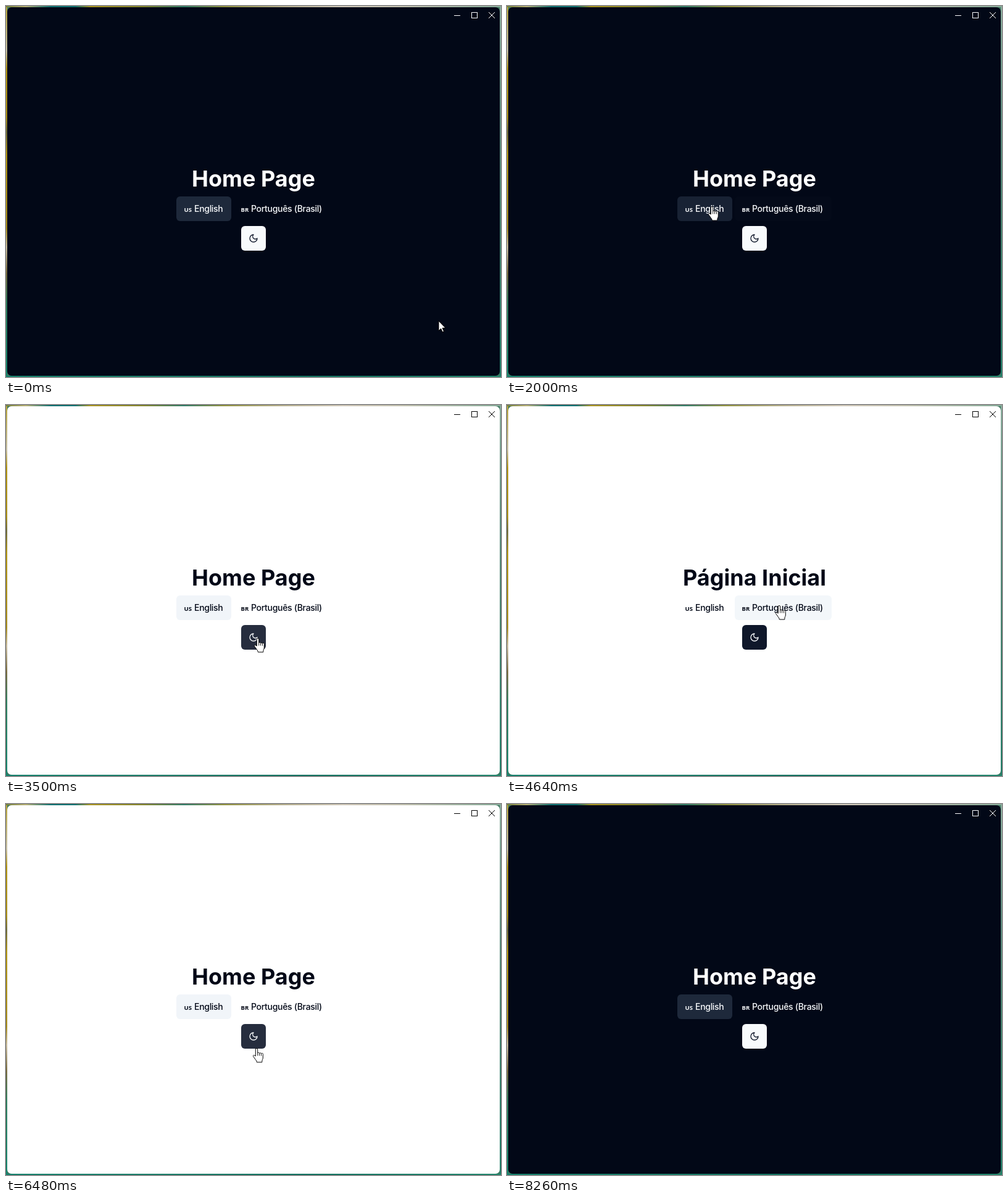
An HTML page that plays this animation: 802 px wide and 602 px high, repeating every 8.8 s.

```html
<!DOCTYPE html>
<html lang="en">
<head>
<meta charset="utf-8">
<title>Home Page</title>
<style>
  html, body { margin: 0; width: 100%; height: 100%; overflow: hidden; }
  body {
    background:
      linear-gradient(90deg, #75803a, #b5ad72 4%, #0d6f70 9%, #0d6f70 14%, #a8921f 17%, #80812a 28%, #2f7a66 36%, #8f8f3c 44%, #b5ad8c 56%, #cfc7b8 68%, #c2c0ae 80%, #86ab98) 0 0 / 100% 2px no-repeat,
      linear-gradient(90deg, #15806c, #1b7c68 30%, #12705f 60%, #22856c) 0 100% / 100% 2px no-repeat,
      linear-gradient(#b5a235, #c4bda2 12%, #b0920f 17%, #a88d14 30%, #6d6a3a 34%, #b0930f 40%, #a58a1a 60%, #c3b79b 65%, #77693c 72%, #2c7c5c 80%, #12836c) 0 0 / 2px 100% no-repeat,
      linear-gradient(#8aae9d, #5f8d80 30%, #43806d 60%, #1d7c66) 100% 0 / 2px 100% no-repeat,
      #3f7a62;
  }
  svg { display: block; }
  text { font-family: Inter, sans-serif; white-space: pre; }
  #title { font-size: 36px; font-weight: 700; text-anchor: middle; }
  .label { font-size: 14px; font-weight: 500; letter-spacing: -.3px; }
  .flag { font: 600 9.6px "Noto Sans", sans-serif; }
</style>
</head>
<body>
<svg width="802" height="602" viewBox="0 0 802 602">
  <rect id="win" x="2" y="2" width="798" height="598" rx="7"/>
  <g id="controls" fill="none">
    <path d="M726 15.5h10M754.5 10.5h9v9h-9z" shape-rendering="crispEdges"/>
    <path d="M782 10l10 10M792 10l-10 10"/>
  </g>
  <text id="title" x="401" y="293"></text>
  <rect id="enBox" x="276" y="309" width="89" height="40" rx="6"/>
  <g id="enText"><text class="flag" x="288.5" y="334">US</text><text class="label" x="305" y="334">English</text></g>
  <rect id="ptBox" x="369" y="309" width="157" height="40" rx="6"/>
  <g id="ptText"><text class="flag" x="380.5" y="334">BR</text><text class="label" x="397" y="334">Português (Brasil)</text></g>
  <rect id="modeBox" x="381" y="357" width="40" height="40" rx="6"/>
  <path id="moon" transform="translate(393 369) scale(.6667)" d="M12 3a6 6 0 0 0 9 9 9 9 0 1 1-9-9Z" fill="none" stroke-width="2" stroke-linecap="round" stroke-linejoin="round"/>
  <g id="cursor" fill="#fff" stroke="#000" stroke-linejoin="round">
    <path id="arrow" d="M0 0V16l3.7-3.5 2.4 5.5 2.4-1-2.4-5.4h5z"/>
    <g id="hand" transform="translate(-6.2 0)">
      <path d="M4.5 13V2.2a1.7 1.7 0 0 1 3.4 0V8a1.6 1.6 0 0 1 2.9.6 1.6 1.6 0 0 1 2.9.7 1.5 1.5 0 0 1 2.8 1.2V16c0 2-1.5 3-1.5 5.5V23H6.5c0-2.5-2-3.8-3.2-6L.8 13.6c-.8-1.5.8-2.6 2-1.6z"/>
      <path d="M7.9 8v4.5M10.8 8.8v3.7M13.7 9.6v3" fill="none" stroke-width=".9"/>
    </g>
  </g>
</svg>
<script>
const LOOP = 8800, STEP = 20, FADE = 150, CURSOR_GONE = 8260;
const $ = id => document.getElementById(id);

// Cursor path: time, x, y
const path = [
  [60, 701, 511], [580, 462, 333], [1000, 462, 333], [1160, 356, 319], [1540, 332, 325],
  [2340, 332, 325], [2660, 404, 389], [2860, 404, 389], [2980, 402, 387],
  [3420, 402, 387], [3840, 441, 325], [4640, 441, 325], [4960, 344, 328.5],
  [5580, 344, 328.5], [6220, 406, 396], [6480, 406, 396], [6560, 406, 393],
  [7680, 406, 393], [7880, 414.5, 415.5], [8040, 414.5, 415.5], [8150, 445, 458], [8260, 534, 588]
];
const langClicks = [900, 1900, 4000, 5260];
const themeClicks = [3060, 6560];

const navy = [2, 8, 23], ink = [15, 23, 42], snow = [248, 250, 252];
const lerp = (a, b, k) => a + (b - a) * k;
const mix = (a, b, k) => a.map((v, i) => lerp(v, b[i], k));
const css = c => `rgba(${c.map((v, i) => i < 3 ? Math.round(v) : v)})`;
const glide = u => (u + u * u * (3 - 2 * u)) / 2;

// cubic-bezier(.4, 0, .2, 1)
function ease(x) {
  if (x <= 0 || x >= 1) return x <= 0 ? 0 : 1;
  let lo = 0, hi = 1, s;
  for (let i = 0; i < 16; i++) {
    s = (lo + hi) / 2;
    const bx = 1.2 * s * (1 - s) ** 2 + .6 * s * s * (1 - s) + s ** 3;
    if (bx < x) lo = s; else hi = s;
  }
  return s * s * (3 - 2 * s);
}

function cursorAt(t) {
  const i = path.findIndex(p => p[0] > t);
  if (i === 0) return path[0].slice(1);
  if (i < 0) return path.at(-1).slice(1);
  const [a, b] = [path[i - 1], path[i]];
  return mix(a, b, glide((t - a[0]) / (b[0] - a[0]))).slice(1);
}

function hit([x, y]) {
  const inside = (l, t, w, h) => x >= l && x < l + w && y >= t && y < t + h;
  return inside(276, 309, 89, 40) ? 'en' : inside(369, 309, 157, 40) ? 'pt' : inside(381, 357, 40, 40) ? 'mode' : '';
}

const toggled = (clicks, t) => clicks.filter(c => c <= t).length % 2;
const stateAt = t => ({
  t,
  dark: !toggled(themeClicks, t),
  lang: toggled(langClicks, t) ? 'pt' : 'en',
  hover: hit(cursorAt(t))
});

const states = [];
for (let t = 0; t < LOOP; t += 4) {
  const s = stateAt(t), last = states.at(-1);
  if (!last || ['dark', 'lang', 'hover'].some(k => s[k] !== last[k])) states.push(s);
}

// Follows a colour through each state change as a CSS transition would
function fade(target, t) {
  let value = target(states[0]);
  states.forEach((s, i) => {
    if (!i || s.t > t) return;
    const end = Math.min(t, states[i + 1]?.t ?? LOOP);
    value = mix(value, target(s), ease((end - s.t) / FADE));
  });
  return css(value);
}

const langBox = id => s => {
  const alpha = s.lang === id ? (s.hover === id ? .8 : 1) : +(s.hover === id);
  return [...(s.dark ? [30, 41, 59] : [241, 245, 249]), alpha];
};
const labelColor = s => s.dark ? snow.concat(1) : navy.concat(1);
const modeBox = s => [...(s.dark ? snow : ink), s.hover === 'mode' ? .9 : 1];
const moonColor = s => s.dark ? ink.concat(1) : snow.concat(1);

function draw(t) {
  const s = stateAt(t), pos = cursorAt(t);
  const paint = (id, color, attr = 'fill') => $(id).setAttribute(attr, color);
  paint('win', s.dark ? css(navy) : '#fff');
  paint('controls', s.dark ? '#fff' : '#000', 'stroke');
  paint('title', css(s.dark ? [255, 255, 255] : navy));
  $('title').textContent = s.lang === 'en' ? 'Home Page' : 'Página Inicial';
  for (const id of ['en', 'pt']) {
    paint(id + 'Box', fade(langBox(id), t));
    paint(id + 'Text', fade(labelColor, t));
  }
  paint('modeBox', fade(modeBox, t));
  paint('moon', fade(moonColor, t), 'stroke');
  $('cursor').setAttribute('transform', `translate(${pos.map(Math.round)})`);
  $('cursor').style.display = t < CURSOR_GONE ? '' : 'none';
  $('arrow').style.display = s.hover ? 'none' : '';
  $('hand').style.display = s.hover ? '' : 'none';
}

const start = performance.now();
function tick() {
  const t = (performance.now() - start) % LOOP;
  draw(Math.floor(t / STEP) * STEP);
  requestAnimationFrame(tick);
}
tick();
</script>
</body>
</html>
```
